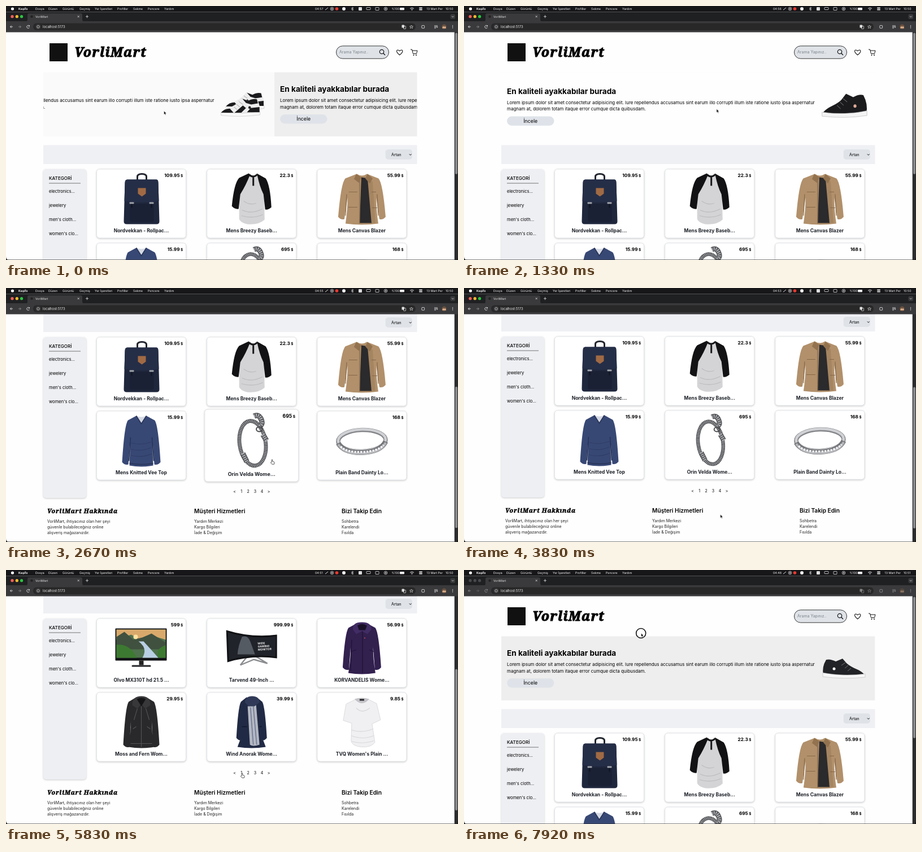
An HTML page for the animation above (8000 ms loop, 800 px wide and 450 px high).

```html
<!DOCTYPE html>
<html lang="tr">
<head>
<meta charset="utf-8">
<title>VorliMart</title>
<style>
html, body { margin: 0; width: 100%; height: 100%; overflow: hidden; background: #fff; }
svg { display: block; width: 800px; height: 450px; font-family: Inter, sans-serif; }
text { white-space: pre; }
.brand { font-family: "Noto Serif", serif; font-weight: 900; font-style: italic; stroke: #000; stroke-width: .045em; }
.shadow { filter: drop-shadow(0 1px 1.5px #0003); }
</style>
</head>
<body>
<svg id="stage" viewBox="0 0 800 450"></svg>
<script>
const LOOP = 8000;
const text = (x, y, size, str, attrs = '') =>
  `<text x="${x}" y="${y}" font-size="${size}" ${attrs}>${str}</text>`;
const rect = (x, y, w, h, fill, r = 0, attrs = '') =>
  `<rect x="${x}" y="${y}" width="${w}" height="${h}" rx="${r}" fill="${fill}" ${attrs}/>`;
const dot = (x, y, r, fill, attrs = '') => `<circle cx="${x}" cy="${y}" r="${r}" fill="${fill}" ${attrs}/>`;
const shape = (d, fill, attrs = '') => `<path d="${d}" fill="${fill}" ${attrs}/>`;
const line = (d, color, width = 1, attrs = '') =>
  `<path d="${d}" fill="none" stroke="${color}" stroke-width="${width}" ${attrs}/>`;
const ring = (x, y, rx, ry, color, width, attrs = '') =>
  `<ellipse cx="${x}" cy="${y}" rx="${rx}" ry="${ry}" fill="none" stroke="${color}" stroke-width="${width}" ${attrs}/>`;
const group = (content, attrs = '') => `<g ${attrs}>${content}</g>`;
const BOLD = 'font-weight="700"', SEMI = 'font-weight="600"', MIDDLE = 'text-anchor="middle"';

// Product pictures, centred on 0,0 and about 90 px across
const garment = (color, hem, cuff, cuffY, bottom = 44) => {
  const shoulder = cuff * .7, pit = shoulder - 4;
  return shape(
    `M-9-44L${-shoulder}-36Q${-cuff * .88}-28 ${-cuff} ${cuffY}Q${5 - cuff} ${cuffY + 6} ${11 - cuff} ${cuffY + 4}` +
    `L${-pit}-2Q${-pit} 20 ${-hem} ${bottom}Q0 ${bottom + 4} ${hem} ${bottom}Q${pit} 20 ${pit}-2` +
    `L${cuff - 11} ${cuffY + 4}Q${cuff - 5} ${cuffY + 6} ${cuff} ${cuffY}Q${cuff * .88}-28 ${shoulder}-36L9-44Q0-38-9-44Z`, color);
};

const backpack = () =>
  line('M-7-33v-6q0-5 8-5t8 5v6', '#23272f', 3) + shape('M-25-34H27Q30-34 30-28L32 40Q32 45 27 45H-26Q-31 45-31 40L-29-28Q-29-34-25-34Z', '#1f273d') +
  shape('M-25-34H27Q30-34 30-28L31 4Q0 9-30 4L-29-28Q-29-34-25-34Z', '#252e47') +
  rect(-20, 9, 42, 32, '#1a2135', 3) + shape('M-6-19h14v10l-7 5-7-5Z', '#a06a44') +
  line('M-17 8V16M18 8V16', '#10151f', 2) + rect(-21, 6, 8, 3, '#a0a4ab', 1) + rect(14, 6, 8, 3, '#a0a4ab', 1);

const raglan = () =>
  shape('M-9-41Q-22-34-22-14L-22 36Q-20 42-8 45 12 47 23 37L22-14Q22-32 11-41Z', '#d4d4d6') +
  shape('M-5-45L-22-37Q-31-28-35 13-30 19-23 18L-20-8Q-10-24-3-42ZM9-45L25-36Q33-24 35 15 30 20 24 19L21-8Q14-22 10-42Z', '#121214') +
  line('M-5-43Q3-36 10-43M3-39V-23', '#17171a', 3) + line('M-17 20Q0 28 19 18M-18 30Q2 36 20 28M-14 4Q-4 12 8 8', '#bcbcc0', 1.2);

const jacket = () =>
  garment('#b1906b', 29, 42, 32) + shape('M-1-38L12-36 18 43H-4Z', '#2b2a2c') + shape('M10-36L19-30 24 43 17 43Z', '#a58561') +
  shape('M-10-44L-1-38-5-28-14-35ZM10-44L6-36 14-27 19-36Z', '#93734f') +
  line('M-23-12H-8M17-12H25M-24 15H-8M18 16H27M-4-32V44M-27-8L-29 30M27-8L29 30', '#86684a', 1.2);

const sweater = () =>
  garment('#384875', 21, 34, 38) + shape('M-9-44L0-30 9-44Q0-40-9-44Z', '#d5d9e4') +
  line('M-9-44L0-30 9-44M-19-6L-22 36M19-6L22 36M-21 40Q0 44 21 40', '#263356', 1.6) +
  line('M-18 4Q0 9 18 2M-18 15Q0 20 18 12M-18 26Q0 31 19 23', '#2f3e67', 1.2);

const bracelet = () => {
  const tilt = 'transform="rotate(-8)"';
  return ring(1, 5, 22, 38, '#4c4d50', 6.5, tilt) +
    ring(1, 5, 22, 38, '#a9aaae', 5, tilt + ' stroke-dasharray="1.2 1.4"') +
    line('M4-41Q12-45 16-36T13-24M19-10L25 0M-15 22L-8 36', '#55565a', 9) +
    line('M4-41Q12-45 16-36T13-24M19-10L25 0M-15 22L-8 36', '#b5b6b9', 6, 'stroke-dasharray="1.600 1.800"') +
    ring(13, -19, 5, 4, '#4c4d50', 2);
};

const band = () =>
  group(ring(0, 0, 42, 19, '#85868a', 7.5) + ring(0, -1, 42, 19, '#d0d1d4', 4.5) +
    line('M-42 3Q-32 21 0 21T42 3', '#77787c', 9) + line('M-42 5Q-32 23 0 23T42 5', '#b5b6ba', 4) +
    line('M-38 9Q-28 20 0 20T38 9', '#f4f4f6', 3.5, 'stroke-dasharray="3.500 1.800"'), 'transform="rotate(-2)"');

const haloRing = () =>
  group(ring(16, 13, 22, 31, '#7d7f85', 4) + ring(4, 15, 22, 28, '#8b8d93', 5) +
    ring(4, 15, 22, 28, '#e6e7ea', 2.5, 'stroke-dasharray="2 1.4"') +
    ring(16, 13, 22, 31, '#dcdde1', 1.8, 'stroke-dasharray="2 1.4"'), 'transform="rotate(-25)"') +
  group(rect(-35, -41, 45, 45, '#999ba1', 9) + rect(-32, -38, 39, 39, '#ecedf0', 8, 'stroke="#777" stroke-width="2" stroke-dasharray="2 2"') +
    rect(-25, -31, 25, 25, '#c9ccd3', 5) + shape('M-23-18L-12-29 -2-18 -12-8Z', '#fafafc'), 'transform="rotate(-10 -12 -18)"');

const roseRings = () => [-25, 23].map(x =>
  rect(x - 15, -22, 30, 40, '#d99a80', 4) + `<ellipse cx="${x - 8}" cy="-2" rx="13" ry="24" fill="#f1c9b6" stroke="#b97760" stroke-width="2.5"/>` +
  `<ellipse cx="${x - 7}" cy="-2" rx="9" ry="18" fill="#fff3ea"/>` +
  line(`M${x + 13}-25Q${x + 25}-2 ${x + 13} 22`, '#c88268', 4)).join('');

const drive = side => () =>
  (side ? rect(-30, -44, 30, 88, side, 5) : '') + rect(side ? -26 : -33, -45, side ? 55 : 66, 90, '#1b1c1f', 4) +
  (side ? shape('M29-42L-8-44 29-7Z', '#2d2e32') + rect(-5, -3, 9, 6, '#888b90', 1)
        : rect(-19, -42, 13, 9, '#0e0f11') + line('M-20-29L33-45M-31 40H31', '#2c2d31', 1));

const labelledDisk = () =>
  rect(-45, -31, 91, 62, '#2b2b2e', 2) + rect(-30, -29, 68, 57, '#17171a') + rect(-30, 5, 68, 23, '#24161a') +
  text(-16, -10, 7, 'SSD CORE', 'fill="#fff" font-weight="700" font-style="italic"') +
  text(-17, 1, 3.4, 'Solid State Drive', 'fill="#bbb"') + rect(-4, 9, 16, 16, '#d8232a') +
  line('M-44-30H45', '#55565a', 1);

const silverDisk = () =>
  rect(-45, -31, 91, 62, '#17181b', 3) + shape('M-30-16h18l9 15-9 15h-18l-9-15Z', '#20393b') +
  line('M-34-1H-5M-28-13L-13 12M-28 12L-13-13', '#5c7d72', 1) + dot(11, -6, 6, '#f4f4f4') +
  text(1, 5, 3, 'SOLID STATE DRIVE', 'fill="#ddd"') + rect(-45, 20, 91, 9, '#2c2d30') +
  text(-42, 27, 6, 'CE', 'fill="#eee"') + rect(8, 20, 37, 9, '#eee') + text(17, 27, 6, '256', BOLD);

const monitor = () =>
  rect(-46, -35, 91, 57, '#121316', 1) + rect(-44, -33, 87, 50, '#4f714d') +
  shape('M-44-33H43V-15L20-22 0-14-18-24-44-15Z', '#d9a96b') + shape('M-44-20L-30-29-14-15 2-19 18-26 43-10V2H-44Z', '#40513f') +
  shape('M-5-12Q12 0 2 17H30Q15 0 4-12Z', '#b9cfe3') + shape('M-44-6Q-20-8-8 17H-44ZM43-5Q25 0 30 17H43Z', '#3d7a31') +
  dot(-10, -20, 4, '#ffe2a1') + rect(-4, 22, 8, 8, '#222') + rect(-17, 30, 34, 3, '#26272a', 1.5);

const curvedMonitor = () =>
  line('M-8 15L-20 30M8 15L28 27M-20 30L4 20 28 27', '#8a8c90', 2.4) +
  shape('M-45-32Q0-18 45-24L45 18Q0 12-43 25Z', '#111215') + shape('M-42-28Q0-15 43-21L42 15Q0 9-40 21Z', '#202329') +
  shape('M-17-20Q-7-24-2-11L6 11H-25Q-24-4-17-20Z', '#555b63') +
  group(['WIDE', 'GAMING', 'MONITOR'].map((s, i) => text(11, -6 + i * 5.5, 5, s, 'fill="#eee" font-weight="700"')).join(''), 'transform="rotate(-3)"');

const coat = () =>
  garment('#32204f', 24, 34, 34) + shape('M-16-33Q-17-46 0-46T17-33L10-25 0-30-10-25Z', '#412c64') +
  shape('M-8-40Q0-46 9-40L6-32H-5Z', '#191028') + line('M1-30V44M-20 6L-10 3M13 3L21 6M-18-15L-20 40', '#201335', 1.3) +
  dot(5, -18, 1, '#d04a58');

const leather = () =>
  garment('#29292b', 23, 32, 40) + shape('M-16-30Q-16-46 0-46T16-30L7-24 0-32-7-24Z', '#38383b') +
  shape('M-8-41L0-28 8-41Q0-45-8-41Z', '#151517') + line('M0-28V44M-7-24L-13-4M8-24L14-4M-15 12L-9 8M10 8L16 12M-19 38H19', '#545458', 1.1);

const raincoat = () =>
  garment('#212a44', 25, 27, 28) + shape('M-7-28L8-30 14 40Q2 44-3 40Z', '#b4b8c2') +
  line('M-2-26L3 40M3-28L9 40', '#65708f', 1.4) + shape('M-12-35Q-11-46 1-46T14-35L5-28-5-28Z', '#303a58') +
  line('M-17 8H-8M14 8H18', '#10172a', 1.3);

const blouse = () =>
  shape('M-12-40L-28-32-33-3-18 2-19 34Q-16 43 0 44T23 36L18 3 33-4 26-33 12-40Q0-28-12-40Z', '#f0f0f2', 'stroke="#dcdce0"') +
  line('M-18 14Q0 20 20 12M-19 24Q2 32 21 24M-18 34Q0 40 21 33M-10-25Q0-14 14-25', '#d8d8dd', 1.2) +
  shape('M-13-41Q0-45 13-41Q0-26-13-41Z', '#c3c3c8') + rect(-4, -41, 8, 3, '#28282a');

const catalogue = [
  [['Nordvekkan - Rollpac...', '109.95', backpack], ['Mens Breezy Baseb...', '22.3', raglan],
   ['Mens Canvas Blazer', '55.99', jacket], ['Mens Knitted Vee Top', '15.99', sweater],
   ['Orin Velda Wome...', '695', bracelet], ['Plain Band Dainty Lo...', '168', band]],
  [['Clear Halo Twinned...', '9.99', haloRing], ['Flared Ivy Blush T...', '10.99', roseRings],
   ['QZ 2TB Granites P...', '64', drive()], ['Dunvolt SSD CORE 1T...', '109', labelledDisk],
   ['Cobaltic Drive 256G...', '109', silverDisk], ['QZ 4TB Player Dri...', '114', drive('#2f46c8')]],
  [['Olvo MX310T hd 21.5 ...', '599', monitor], ['Tarvend 49-Inch ...', '999.99', curvedMonitor],
   ['KORVANDELIS Wome...', '56.99', coat], ['Moss and Fern Wom...', '29.95', leather],
   ['Wind Anorak Wome...', '39.99', raincoat], ['TVQ Women\'s Plain ...', '9.85', blouse]]
];

// Shop page
const CARD = { w: 158, h: 122 };
const cardX = i => 160.5 + (i % 3) * 195.2;
const cardY = i => 289 + Math.floor(i / 3) * 131;

const card = i => {
  const contents = catalogue.map(items => {
    const [title, price, art] = items[i];
    return group(group(art(), 'transform="translate(79 52.5)"') + text(79, 112, 8.5, title, `${BOLD} ${MIDDLE} fill="#1c2027"`) +
      text(147, 14, 8.2, price, `${BOLD} text-anchor="end"`) + text(148.5, 14, 6.3, '$', BOLD), 'class="content"');
  }).join('');
  return group(rect(0, 0, CARD.w, CARD.h, '#fff', 5, 'class="shadow" stroke="#e2e4e8"') + contents, 'class="card"');
};

const shoe = (upper, sole, accent) =>
  shape('M-37 12C-31 2-15 1-5-9L2-17 14-12Q24-17 31-15 39-2 36 12Z', upper) +
  shape('M-38 10Q0 15 37 8V15Q0 20-38 16Z', sole, 'stroke="#aaa" stroke-width=".5"') +
  line('M-13 0L-7 5M-8-5L-2 0M-3-10L4-5', '#888', .8) + dot(17, 1, 2.5, accent);

const sneakerPair = () => {
  const one = shoe('#ededee', '#fafafa', '#222') +
    shape('M-38 11Q-32 3-21 3L-14 11ZM3-16L14-12Q24-17 31-15L33-7 20-5 10-8ZM-12 11L4-3 10 2 1 11ZM19 2L36 0V10H12Z', '#1b1b1d');
  return group(one, 'transform="translate(4 -6) scale(.9)"') + group(one, 'transform="translate(-4 5) scale(.92)"');
};

const slide = (index, bg, dy, picture) => group(
  rect(66, 117.5, 661.5, 113.5, bg) +
  group(text(76, 152, 13.6, 'En kaliteli ayakkabılar burada', BOLD) +
    text(76, 170, 7.95, 'Lorem ipsum dolor sit amet consectetur adipisicing elit. Iure repellendus accusamus sint earum illo corrupti illum iste ratione iusto ipsa aspernatur') +
    text(76, 181.7, 7.95, 'magnam at, dolorem totam itaque error cumque dicta quibusdam.') +
    rect(76, 192, 83.5, 16.5, '#dfe3e9', 8.2) + text(117.7, 203.2, 8.8, 'İncele', MIDDLE), `transform="translate(0 ${dy})"`) +
  group(picture, 'transform="translate(672 174)"'), `transform="translate(${index * 661.5} 0)"`);

const header =
  rect(77, 66, 32, 32, '#111') + text(121, 89.5, 23, 'VorliMart', 'class="brand" letter-spacing="1.2"') +
  rect(584.5, 70.8, 93, 22.4, '#dfe3e8', 11.2, 'stroke="#222" stroke-width=".9"') + text(590, 84.4, 7, 'Arama Yapınız..', 'fill="#7b828b"') +
  dot(665, 81, 3.7, 'none', 'stroke="#111" stroke-width="1.2"') + line('M667.8 83.8L671 87', '#111', 1.3) +
  line('M696.7 86.7C688 80 692 75.5 696.7 79.6C701.4 75.5 705.4 80 696.7 86.7Z', '#111', 1.1) +
  line('M716 77H718.5L720.5 84.5H726.5L728 79H719', '#111', 1) + dot(721.5, 87, 1, '#111') + dot(726, 87, 1, '#111');

const banner = group(group(
  slide(0, '#fafafa', 0, sneakerPair()) +
  slide(1, '#eee', 0, group(shoe('#222327', '#f7f7f7', '#fff'), 'transform="scale(-1 1)"')) +
  slide(2, '#fefefe', 3.5, group(shoe('#1b1b1d', '#f4f4f4', '#e0a898'), 'transform="translate(2 2) scale(1.06 1.2)"')),
  'id="slides"'), 'clip-path="url(#bannerClip)"');

const toolbar = rect(66, 246.5, 661.5, 33.5, '#eff0f4') + rect(671.5, 254, 47.5, 18, '#dfe3e8', 5) +
  text(682, 265.7, 6.9, 'Artan') + line('M713.8 262.3L715.7 264.3L717.6 262.3', '#111', 1);

const sidebar = rect(66, 289, 76, 285, '#eeeff3', 5, 'class="shadow"') + text(76, 307.5, 8.1, 'KATEGORİ', 'font-weight="500"') +
  line('M76 314H132', '#555', .8) +
  ['electronics...', 'jewelery', 'men\'s cloth...', 'women\'s clo...'].map((s, i) => text(76, 330.6 + i * 25, 7.6, s)).join('');

const pagination = ['&lt;', 1, 2, 3, 4, '&gt;'].map((s, i) => text(404.5 + i * 12.1, 564.6, 7, s, MIDDLE)).join('');

const footerColumn = (x, title, rows, attrs, size = 10.2) => text(x, 601, size, title, attrs) +
  rows.map((s, i) => text(x, 618 + i * 10, 7, s, 'fill="#222"')).join('');
const footer =
  footerColumn(73, 'VorliMart Hakkında', ['VorliMart, ihtiyacınız olan her şeyi', 'güvenle bulabileceğiniz online', 'alışveriş mağazanızdır.'], 'class="brand" letter-spacing=".7"', 10.8) +
  footerColumn(333, 'Müşteri Hizmetleri', ['Yardım Merkezi', 'Kargo Bilgileri', 'İade &amp; Değişim'], SEMI) +
  footerColumn(594, 'Bizi Takip Edin', ['Sohbetra', 'Karelendi', 'Fısılda'], SEMI);

// Desktop menu bar and browser frame
const menu = [['Kaşifo', 22, BOLD], ['Dosya', 52], ['Düzen', 75], ['Görüntü', 100], ['Geçmiş', 130], ['Yer İşaretleri', 157],
  ['Profiller', 197], ['Sekme', 225], ['Pencere', 251], ['Yardım', 280]];
const menuBar = rect(0, 0, 800, 10.5, '#171619') + group(
  dot(11.5, 5, 2.6, '#fff') + menu.map(([s, x, attrs]) => text(x, 7, 5.3, s, attrs)).join('') +
  text(547, 7, 5.3, '', 'id="timer"') + line('M565 7L570 3', '#ddd', 1) + dot(577, 5, 2.8, 'none', 'stroke="#ddd" stroke-width=".8"') +
  dot(577, 5, 1.2, '#ddd') + dot(585.5, 5, 2.8, '#e8392f') + dot(598, 5, 3, '#eee') + line('M611 3.5L615 6.5L613 8V2L615 3.5L611 6.5', '#ddd', .7) +
  rect(624, 2, 6, 6, '#ddd', 1) + rect(638, 2.5, 7, 4, 'none', .5, 'stroke="#ddd" stroke-width=".8"') +
  rect(654, 2.5, 6, 5, 'none', .5, 'stroke="#ddd" stroke-width=".8"') + dot(672, 5, 2.8, 'none', 'stroke="#ddd" stroke-width=".8"') +
  shape('M671 3.5L674 5L671 6.5Z', '#ddd') + text(682.5, 7, 5.2, '%100') + rect(697, 3, 8, 4.3, '#eee', 1) +
  line('M715 4.5Q718.5 1.5 722 4.5M716.7 6Q718.5 4.5 720.3 6', '#eee', .9) + dot(718.5, 7.3, .7, '#eee') +
  rect(731, 2.5, 6, 2, '#ddd', 1) + rect(731, 5.5, 6, 2, '#ddd', 1) + text(744.5, 7, 5.3, '13 Mart Per') + text(778, 7, 5.3, '', 'id="clock"'), 'fill="#f2f2f2"');

const browser = rect(0, 10.5, 800, 17, '#1f2022') + rect(0, 27, 800, 19.5, '#3a3a3c') +
  shape('M35 27.5Q38 27 38 24V16Q38 13 41 13H132Q135 13 135 16V24Q135 27 138 27.5Z', '#3a3a3c') +
  dot(45.5, 18.7, 2.2, '#222') + text(52, 20.7, 5.2, 'VorliMart', 'fill="#e2e2e2"') +
  line('M126.7 17.2L129.7 20.2M129.7 17.2L126.7 20.2M141 18.7H146M143.5 16.2V21.2', '#ddd', .8) +
  rect(786.5, 14.5, 8.5, 8.5, '#3a3a3c', 2) + line('M789 18L790.8 19.8L792.6 18', '#ddd', .8) +
  rect(48, 30.5, 677, 12.5, '#282829', 6.2) + dot(57, 36.8, 4.5, '#3c3c3e') + dot(57, 36.8, 2.2, 'none', 'stroke="#ddd" stroke-width=".7"') +
  text(65, 38.9, 5.9, 'localhost:5173', 'fill="#f0f0f0"') +
  group(['#ff5f57', '#febc2e', '#28c840'].map((c, i) => dot(11 + i * 8.3, 18.7, 2.6, c)).join(''), 'id="lights"') +
  group([0, 1, 2].map(i => dot(11 + i * 8.3, 18.7, 2.6, '#48494c')).join(''), 'id="dimLights"') +
  group(line('M12 36.8H7.5L9.7 34.6M7.5 36.8L9.7 39', '#ddd', .9) + line('M22 36.8H26.5L24.3 34.6M26.5 36.8L24.3 39', '#888', .9) +
    line('M41.3 35.5A2.5 2.5 0 1 0 41.5 38M41.5 34V36H39.5', '#ddd', .9) +
    rect(700.5, 33.5, 4.5, 5, '#ddd', .6) + rect(703.5, 35.5, 4, 5, 'none', .6, 'stroke="#ddd" stroke-width=".8"') +
    line('M717.5 34L718.4 36H720.5L718.9 37.4L719.5 39.5L717.5 38.3L715.5 39.5L716.1 37.4L714.5 36H716.6Z', '#ddd', .7) +
    rect(735.8, 34.5, 4.8, 4.8, 'none', .8, 'stroke="#ddd" stroke-width=".9"') +
    line('M758 35H764M758 37H762M758 39H761', '#ddd', .9) + shape('M762 36.5H764.5L763.2 39Z', '#ddd') +
    dot(775.5, 36.7, 4.2, '#6b5140') + shape('M772 39.5Q774 33 775.5 38Q777 33 779 39.5Z', '#e0b48e') +
    [34.7, 36.8, 38.9].map(y => dot(790.5, y, .7, '#ddd')).join(''), 'id="tools"');

const stage = document.getElementById('stage');
stage.innerHTML =
  '<clipPath id="bannerClip"><rect x="66" y="117" width="661.5" height="114.5"/></clipPath>' + rect(0, 0, 800, 450, '#fefefe') +
  group(header + banner + toolbar + sidebar + [0, 1, 2, 3, 4, 5].map(card).join('') + pagination + footer, 'id="page"') +
  rect(793.7, 46, 6.3, 404, '#2c2c2e') + rect(795, 47.5, 4, 250.5, '#8a8a8c', 2, 'id="thumb"') + menuBar + browser +
  shape('M0 444Q0 450 6 450H0ZM800 444Q800 450 794 450H800Z', '#111') + rect(0, 449.4, 800, .6, '#333') +
  dot(0, 0, 8.5, '#fff8', 'id="clickRing" stroke="#111" stroke-width="1.6"') +
  shape('M0 0V6.3L1.5 5L2.5 7.2L3.6 6.7L2.6 4.6H4.6Z', '#111', 'id="arrow" stroke="#fff" stroke-width=".5"') +
  shape('M-.9 0Q0-1 .9 0V3L3.5 3.7Q4.4 4 4.2 5L3.5 7.7H-.3L-2.7 4.9Q-2.3 3.7-.9 4.3Z', '#fff', 'id="hand" stroke="#111" stroke-width=".7"');

const el = id => document.getElementById(id);
const cards = [...document.querySelectorAll('.card')];
const contents = cards.map(c => [...c.querySelectorAll('.content')]);

// Motion
const smooth = p => p * p * (3 - 2 * p);
const easeOut = p => 1 - (1 - p) ** 1.8;
const track = (keys, t, ease = smooth) => {
  const next = keys.findIndex(k => k[0] > t);
  if (next === 0) return keys[0].slice(1);
  if (next < 0) return keys[keys.length - 1].slice(1);
  const a = keys[next - 1], b = keys[next], p = ease((t - a[0]) / (b[0] - a[0]));
  return a.slice(1).map((v, i) => v + (b[i + 1] - v) * p);
};
const slideKeys = [[-115, 0], [380, 1], [700, 1], [1200, 2], [5000, 2], [5500, 1]];
const scrollKeys = [[1370, 0], [1650, 202], [2800, 202], [3200, 203], [7400, 203], [7740, 0]];
const cursorKeys = [[0, 279.5, 186], [250, 279.5, 186], [1200, 447, 182.5], [1650, 447, 182.5], [2400, 471, 304.5],
  [2800, 471, 304.5], [3700, 458, 408], [4250, 428, 360], [4550, 428, 360], [4850, 440, 360], [5200, 440, 360],
  [5650, 418, 360.5], [6150, 418, 360.5], [6900, 512, 346.5], [7400, 512, 346.5], [7860, 313.5, 112]];
const timerTicks = [900, 1900, 2950, 3800, 4700, 5500, 6500, 7450, 7850];

const hoveredCard = t => {
  const [x, y] = track(cursorKeys, t), pageY = y + track(scrollKeys, t)[0];
  return cards.findIndex((_, i) => x > cardX(i) && x < cardX(i) + CARD.w && pageY > cardY(i) && pageY < cardY(i) + CARD.h);
};
const show = (node, visible) => node.setAttribute('display', visible ? 'inline' : 'none');
const move = (node, x, y, extra = '') => node.setAttribute('transform', `translate(${x} ${y}) ${extra}`);

function draw(t) {
  const [scroll] = track(scrollKeys, t), [x, y] = track(cursorKeys, t);
  move(el('page'), 0, -scroll);
  move(el('thumb'), 0, scroll * .63);
  move(el('slides'), -661.5 * track(slideKeys, t, easeOut)[0], 0);

  const shown = t < 4480 || t >= 6050 ? 0 : t < 5120 ? 1 : 2;
  // Hover growth is the share of the last 160 ms spent over a card
  const recent = Array.from({ length: 16 }, (_, k) => hoveredCard(Math.max(0, t - k * 10)));
  cards.forEach((node, i) => {
    const scale = 1 + .05 * recent.filter(c => c === i).length / recent.length;
    move(node, cardX(i) + CARD.w / 2, cardY(i) + CARD.h / 2, `scale(${scale}) translate(${-CARD.w / 2} ${-CARD.h / 2})`);
    contents[i].forEach((c, n) => show(c, n === shown));
  });

  const overPages = scroll > 190 && y > 353 && y < 368 && x > 400 && x < 470;
  const pointing = recent[0] >= 0 || overPages;
  move(el('arrow'), x, y);
  move(el('hand'), x, y);
  move(el('clickRing'), x - .3, y);
  show(el('arrow'), !pointing);
  show(el('hand'), pointing);

  const unfocused = t >= 7860;
  show(el('clickRing'), unfocused);
  show(el('lights'), !unfocused);
  show(el('dimLights'), unfocused);
  el('tools').setAttribute('opacity', unfocused ? .5 : 1);
  el('timer').textContent = '04:' + (57 - timerTicks.filter(k => k <= t).length);
  el('clock').textContent = t < 6300 ? '10:50' : '10:51';
}

const start = performance.now();
const frame = () => {
  draw((performance.now() - start) % LOOP);
  requestAnimationFrame(frame);
};
frame();
</script>
</body>
</html>
```
